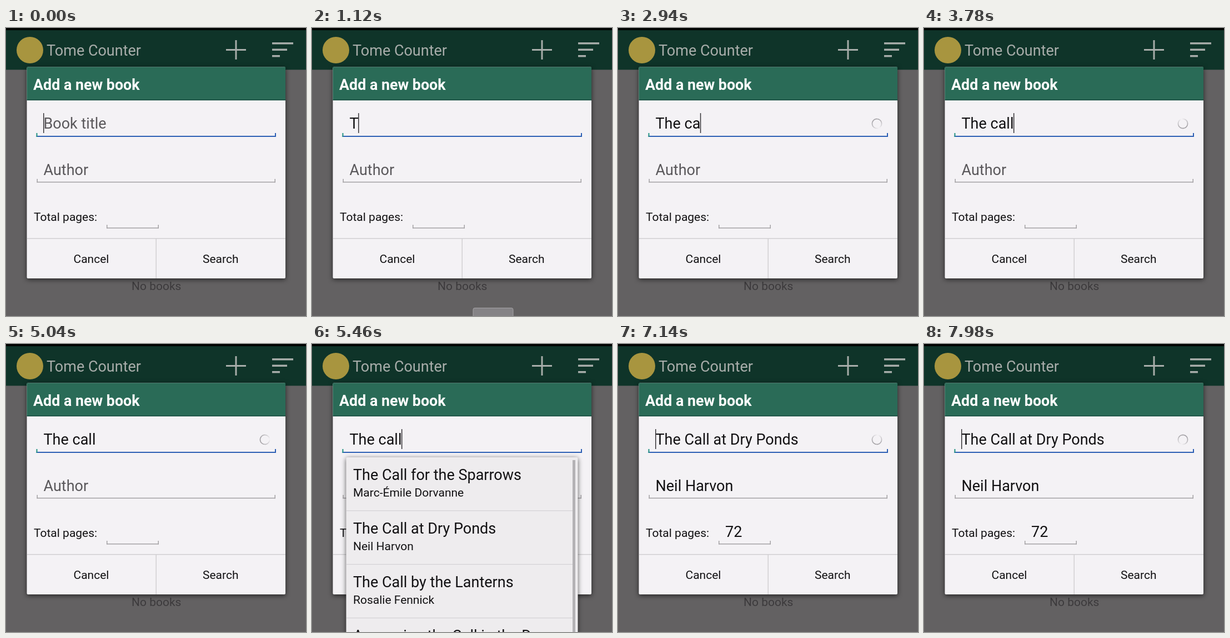
An HTML page with a canvas that plays this animation: 540 by 521 pixels, repeating every 8 s.

```html
<!DOCTYPE html>
<html lang="en">
<head>
<meta charset="utf-8">
<title>Add a new book</title>
<style>
  html, body { margin: 0; width: 100%; height: 100%; overflow: hidden; background: #636162; }
  canvas { display: block; }
</style>
</head>
<body>
<canvas id="stage" width="540" height="521"></canvas>
<script>
const ctx = document.getElementById('stage').getContext('2d');
const LOOP = 8000;
const BIG = 27, SMALL = 21;
const INK = '#121113', HINT = '#5a585b', LINE = '#a3a1a4', ICON = '#a8adaa';

const TYPED = 'The call';
const KEY_TIMES = [900, 1200, 1500, 1850, 2600, 2880, 3160, 3420];
// Key previews tall enough to reach the stage: [key time, centre x]
const PREVIEWS = [[1200, 326], [2880, 56], [3160, 486], [3420, 486]];
// The lookup starts with the fourth character
const SPIN_START = KEY_TIMES[3], LIST_OPEN = 5450, PICKED = 6800;

const BOOKS = [
  ['The Call for the Sparrows', 'Marc-Émile Dorvanne'],
  ['The Call at Dry Ponds', 'Neil Harvon'],
  ['The Call by the Lanterns', 'Rosalie Fennick'],
  ['Answering the Call in the Dunes', '']
];

function rect(x, y, w, h, color) {
  ctx.fillStyle = color;
  ctx.fillRect(x, y, w, h);
}

function text(str, x, y, size, color, weight = 400) {
  ctx.font = `${weight} ${size}px Roboto, sans-serif`;
  ctx.fillStyle = color;
  ctx.fillText(str, x, y);
}

function panel(x, y, w, h, color, blur) {
  ctx.save();
  ctx.shadowColor = 'rgba(0,0,0,.65)';
  ctx.shadowBlur = blur;
  ctx.shadowOffsetY = 2;
  ctx.fillStyle = color;
  ctx.beginPath();
  ctx.roundRect(x, y, w, h, 2);
  ctx.fill();
  ctx.restore();
}

function underline(x1, x2, y, color, thick, tick, left = color) {
  rect(x1, y, x2 - x1, thick, color);
  rect(x1, y - tick, thick, tick + thick, left);
  rect(x2 - thick, y - tick, thick, tick + thick, color);
}

function drawScreen() {
  rect(0, 0, 540, 521, '#636162');
  rect(0, 0, 540, 75.5, '#0f3429');
  rect(0, 0, 540, 4, '#020403');

  ctx.fillStyle = '#a8953f';
  ctx.beginPath();
  ctx.arc(43, 40, 24, 0, Math.PI * 2);
  ctx.fill();

  text('Tome Counter', 73, 50, BIG, ICON);
  rect(396, 38, 36, 3, ICON);
  rect(412.5, 22, 3, 35, ICON);
  [38, 27, 14].forEach((w, i) => rect(479, 26 + i * 11.5, w, 3.5, ICON));
  text('No books', 226, 473.5, SMALL, '#3c3a3c');
}

function drawDialog() {
  panel(37.5, 70.5, 465.5, 382.5, '#f4f2f5', 9);
  rect(37.5, 70.5, 465.5, 59, '#2a6b57');
  rect(37.5, 129, 465.5, 2, '#22584a');
  text('Add a new book', 49, 111.5, 26.8, '#fff', 700);

  underline(54.5, 486, 195, '#2c5fb4', 2, 5, '#239282');
  underline(55.5, 485, 278, LINE, 1.5, 5);
  underline(181, 275, 361, LINE, 1.5, 5);
  text('Total pages:', 50, 349, SMALL, INK);

  rect(38, 380, 465, 1.5, '#d1cfd2');
  rect(269.5, 381, 1.5, 72, '#d1cfd2');
  text('Cancel', 121.5, 425, SMALL, INK);
  text('Search', 354, 425, SMALL, INK);
}

function drawFields(t) {
  const picked = t >= PICKED;
  const count = KEY_TIMES.filter(k => k <= t).length;
  const title = picked ? BOOKS[1][0] : TYPED.slice(0, count);
  text(title || 'Book title', 67.5, 182, BIG, title ? INK : HINT);
  const cursorX = picked ? 67 : 67 + ctx.measureText(title).width;

  text(picked ? BOOKS[1][1] : 'Author', 67.5, 265.5, BIG, picked ? INK : HINT);
  if (picked) text('72', 193, 349, BIG, INK);

  // The blink restarts with every edit
  const edit = picked ? PICKED : count ? KEY_TIMES[count - 1] : 0;
  if ((t - edit) % 1000 < 500) rect(cursorX, 154, 1.5, 36, '#353336');
}

// A ring that turns backwards, two turns in 3.5 s, open and faded at the gap
function drawSpinner(t) {
  const gap = 2.2 - (t / 3500) * Math.PI * 4 + (SPIN_START ? 9.5 : 0);
  const steps = 40, step = Math.PI * 2 / steps;
  ctx.lineWidth = 1.6;
  for (let i = 0; i < steps; i++) {
    const alpha = 0.75 * Math.sin(Math.PI * (i + 0.5) / steps) ** 1.2;
    ctx.strokeStyle = `rgba(125,123,127,${alpha})`;
    ctx.beginPath();
    ctx.arc(466, 173, 8.5, gap + step * i, gap + step * (i + 1));
    ctx.stroke();
  }
}

function drawList() {
  panel(61.5, 205, 417, 340, '#eeecee', 8);
  BOOKS.forEach(([title, author], i) => {
    const y = 205 + i * 97;
    text(title, 74, y + 41, BIG, INK);
    text(author, 74, y + 71, SMALL, INK);
    rect(62, y + 96, 407, 1.2, '#d3d1d4');
  });
  rect(469, 210, 5, 311, '#b4b2b5');
}

function drawPreview(x) {
  ctx.beginPath();
  ctx.roundRect(x - 36, 506.5, 72, 40, 3);
  ctx.fillStyle = '#858386';
  ctx.fill();
  ctx.lineWidth = 1;
  ctx.strokeStyle = '#a4a2a5';
  ctx.stroke();
}

function draw(t) {
  drawScreen();
  drawDialog();
  drawFields(t);
  if ((t >= SPIN_START && t < LIST_OPEN) || t >= PICKED) drawSpinner(t);
  if (t >= LIST_OPEN && t < PICKED) drawList();
  for (const [time, x] of PREVIEWS) {
    if (t >= time - 120 && t < time + 20) drawPreview(x);
  }
}

function tick(now) {
  draw(now % LOOP);
  requestAnimationFrame(tick);
}
draw(0);
requestAnimationFrame(tick);
</script>
</body>
</html>
```
